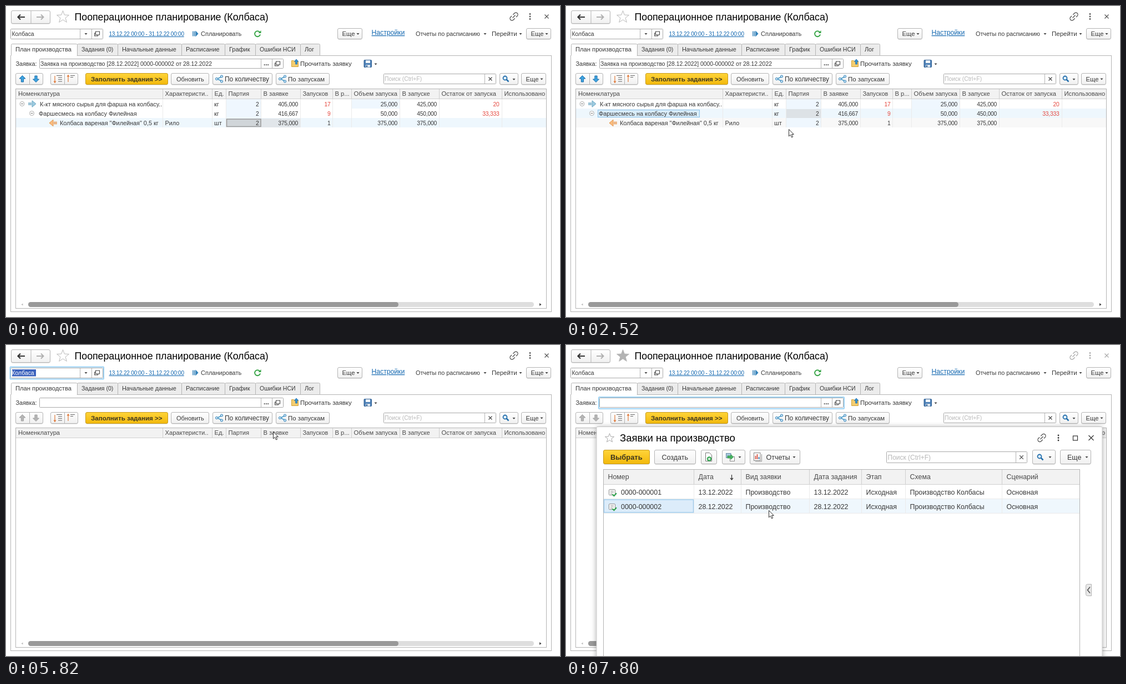
These frames come from a looping animation (998 px wide and 561 px high, 8000 ms). An HTML page:

```html
<!DOCTYPE html>
<html lang="ru">
<head>
<meta charset="utf-8">
<title>Пооперационное планирование</title>
<style>
html, body { margin: 0; width: 100%; height: 100%; overflow: hidden; background: #fff; }
svg { display: block; width: 100%; height: 100%; font-family: "Liberation Sans", Arial, sans-serif; }
text { white-space: pre; }
</style>
</head>
<body>
<svg id="stage" viewBox="0 0 998 561"></svg>
<script>
const LOOP = 8000, TICK = 60;
const SELECT_ROW = 1800, CLEAR = 3780, DIALOG = 6840;
const INK = '#383838', LINE = '#b4b4b4', RED = '#e5483f', BLUE = '#2f7fb8', LINK = '#1468b0';

// drawing helpers
const text = (x, y, s, size = 11, fill = INK, extra = '') =>
  `<text x="${x}" y="${y}" font-size="${size}" fill="${fill}" ${extra}>${s}</text>`;
const num = (x, y, s, fill = INK) =>
  text(x, y, s, 10.3, fill, 'text-anchor="end" letter-spacing="-.2"');
const rect = (x, y, x2, y2, fill = '#fff', stroke = 'none', r = 0, w = 1) =>
  `<rect x="${x}" y="${y}" width="${x2 - x}" height="${y2 - y}" rx="${r}" fill="${fill}" stroke="${stroke}" stroke-width="${w}"/>`;
const path = (d, stroke = INK, w = 1, fill = 'none') =>
  `<path d="${d}" fill="${fill}" stroke="${stroke}" stroke-width="${w}"/>`;
const solid = (d, fill) => path(d, 'none', 0, fill);
const circle = (x, y, r, fill, stroke = 'none', w = 1) =>
  `<circle cx="${x}" cy="${y}" r="${r}" fill="${fill}" stroke="${stroke}" stroke-width="${w}"/>`;
const vline = (x, y, y2, c = LINE) => path(`M${x} ${y}V${y2}`, c);
const at = (x, y, body, turn = '') => `<g transform="translate(${x} ${y}) ${turn}">${body}</g>`;
const during = (from, to, body) => `<g data-from="${from}" data-to="${to}">${body}</g>`;

// widgets
const button = (x, y, x2, y2, fill = 'url(#btn)', stroke = LINE) =>
  rect(x + .5, y + 1.5, x2 - .5, y2 + .5, 'none', '#e4e4e4', 2.5) +
  rect(x + .5, y + .5, x2 - .5, y2 - .5, fill, stroke, 2.5);
const field = (x, y, x2, y2) => rect(x + .5, y + .5, x2 - .5, y2 - .5, '#fff', '#a9a9a9', 1);
const focus = (x, y, x2, y2) => rect(x, y, x2, y2, 'none', '#9ed3f5', 1, 2);
const caret = (x, y) => solid(`M${x - 2.5} ${y - 1}h5l-2.5 3z`, '#444');
const more = (x, y, x2, y2, size = 11.3) => button(x, y, x2, y2) +
  text(x + (size > 12 ? 13 : 8.5), (y + y2) / 2 + size * .36, 'Еще', size) + caret(x2 - 8, (y + y2) / 2);
const cross = (x, y, r = 3.3, c = '#444') =>
  path(`M${x - r} ${y - r}l${2 * r} ${2 * r}M${x + r} ${y - r}l${-2 * r} ${2 * r}`, c, 1.2);
const dots = (x, y, c = INK) => [-4.5, 0, 4.5].map(d => circle(x, y + d, 1.4, c)).join('');
const chain = (x, y, c = '#555') => at(x, y,
  path('M1 -3.5H5a3.5 3.5 0 0 1 0 7H2M-1 3.5H-5a3.5 3.5 0 0 1 0 -7H-2M-3.5 0H3.5', c, 1.3), 'rotate(-45)');
const openIcon = (x, y) => at(x, y, path('M-2.5 -4h7v6h-7zM-2.5 -1h-2v5h6v-2', '#444', 1.1));
const lens = (x, y) => circle(x - 1, y - 1.5, 3.5, '#e3f1fb', '#2570ad', 1.8) + path(`M${x + 1.5} ${y + 1}l4 4`, '#2570ad', 2.5);
const star = (x, y, r, fill, stroke) => {
  const pts = Array.from({length: 10}, (_, i) => {
    const a = Math.PI * (i / 5 - .5), q = i % 2 ? r * .42 : r;
    return `${(x + q * Math.cos(a)).toFixed(1)},${(y + q * Math.sin(a)).toFixed(1)}`;
  });
  return `<polygon points="${pts.join(' ')}" fill="${fill}" stroke="${stroke}"/>`;
};
const share = (x, y) => path(`M${x + 5} ${y - 4}L${x - 4} ${y}L${x + 5} ${y + 4}`, '#4499c8', 1.6) +
  [-1, 0, 1].map(k => circle(x + (k ? 4.5 : -4.5), y + k * 4.5, 2.1, '#cbe7f6', BLUE)).join('');
const moveArrow = (x, dir, fill, stroke) =>
  at(x, 131.5, path('M0 -6l5.5 5.5h-3.4v6h-4.2v-6h-3.4z', stroke, 1, fill), `scale(1 ${dir})`);
const moveArrows = (...colors) => moveArrow(29.5, 1, ...colors) + moveArrow(54, -1, ...colors);
const listIcon = (x, up) => at(x, 131.5, path('M0 -5.5v11', '#e07b3c', 1.2) +
  solid(up ? 'M-2.5 -4l2.5 -4 2.5 4z' : 'M-2.5 4l2.5 4 2.5 -4z', '#e07b3c') +
  path(up ? 'M4 -6h8M4 -3h5' : 'M3 -6h10M6 -2.5h7M6 1h7M6 4.5h7', '#666', 1.1));
const minus = (x, y) => circle(x, y, 4, '#fff', '#aaa') + path(`M${x - 2} ${y}h4`, '#777');
const rowArrow = (x, y, dir, fill, stroke) => at(x, y,
  path('M-1 -2.5v-3.3l7 5.8 -7 5.8v-3.3z', stroke, 1, fill) +
  path('M-7 -2.5v5M-5 -2.5v5M-3 -2.5v5', stroke, 1.3), `scale(${dir} 1)`);

const columns = [18, 282.5, 371.5, 396.5, 459.5, 530.5, 588.5, 622.5, 709.5, 780.5, 893.5];
const titles = ['Номенклатура', 'Характеристи..', 'Ед.', 'Партия', 'В заявке', 'Запусков', 'В р...',
  'Объем запуска', 'В запуске', 'Остаток от запуска', 'Использовано'];
const tabs = [[9, 'План производства', 11.2], [128, 'Задания (0)', 10.5], [201, 'Начальные данные', 10.8],
  [316, 'Расписание', 11], [394, 'График', 11], [449, 'Ошибки НСИ', 10.5], [530, 'Лог', 10.8], [565]];

function windowIcons(starFill, starLine, color) {
  return star(102.5, 20, 11.5, starFill, starLine) + chain(915, 19, color) + dots(944, 19, color) + cross(974, 19, 3.5, color);
}

function header() {
  return button(9, 8, 80, 32) + vline(45, 9, 31) +
    path('M34 20H22M26 15.5L21.5 20l4.500 4.5', '#333', 2.2) +
    path('M55 20h12M63 15.5l4.500 4.500 -4.500 4.5', '#b0b0b0', 2) +
    during(0, DIALOG, windowIcons('#fff', '#b9b9b9', '#555')) +
    during(DIALOG, LOOP, windowIcons('#b3b3b3', '#b3b3b3', '#aaa')) +
    text(123.5, 26, 'Пооперационное планирование (Колбаса)', 17.75, '#000') +
    field(8, 41, 175, 60) + vline(133.5, 42, 59) + vline(154.5, 42, 59) +
    caret(144, 50) + openIcon(164, 50) + text(10.5, 54, 'Колбаса', 10.4) +
    during(CLEAR, DIALOG, rect(11, 44, 54, 56.5, '#3c62bd') + text(10.5, 54, 'Колбаса', 10.4, '#fff') + focus(7.5, 39.5, 176, 61.5)) +
    text(185.5, 54, '13.12.22 00:00 - 31.12.22 00:00', 10, LINK, 'text-decoration="underline" letter-spacing="-.23"') +
    path('M337 45.5v9M339.8 45.5v9', BLUE, 1.6) + solid('M341.5 44.5v11l5 -5.5z', BLUE) +
    text(351, 54, 'Спланировать') +
    path('M457.2 47.3a5 5 0 1 0 .8 4', '#37a547', 1.9) + solid('M459.5 44v5h-5z', '#37a547') +
    more(597, 40, 642, 60) +
    text(658.5, 52, 'Настройки', 12.2, LINK, 'text-decoration="underline"') +
    text(738, 54, 'Отчеты по расписанию', 10.8) + caret(863, 50) +
    text(875, 54, 'Перейти', 11.5) + caret(927, 50) + more(937, 40, 982, 60);
}

function tabBar() {
  let s = rect(8.5, 89.5, 982.5, 551.5, '#fff', LINE);
  tabs.slice(0, -1).forEach(([x, label, size], i) => {
    const end = tabs[i + 1][0];
    s += path(`M${x + .5} 89.5V70.5q0 -2 2 -2H${end - 1.5}q2 0 2 2V89.5`, LINE, 1, i ? '#ececec' : '#fff') +
      text(x + 8, 82, label, size);
  });
  return s + path('M9.5 89.5H127.5', '#fff', 1.4) + path('M128 89.5H565', LINE);
}

function orderBar() {
  return text(17.5, 108, 'Заявка:', 10.8) + field(60, 95, 500, 113) + vline(459.5, 96, 112) + vline(479.5, 96, 112) +
    text(464, 107, '...', 11.5, '#222', 'font-weight="bold"') + openIcon(489, 104) +
    during(0, CLEAR, text(62, 108, 'Заявка на производство [28.12.2022] 0000-000002 от 28.12.2022', 10.37)) +
    during(DIALOG, LOOP, focus(59, 94, 501, 115)) +
    path('M514.5 109.5v-11h4l1.5 2h6.5v9z', '#d2a33c', 1, '#f4cd6f') +
    path('M521.5 105v-5h-2.2l3.7 -4 3.7 4h-2.2v5z', '#266fa8', .8, '#3a93d0') +
    text(530, 108, 'Прочитать заявку', 11.35) +
    rect(645, 97.5, 658.5, 110.5, '#4a7eb5', '#315f92', 1) + rect(648, 98, 656, 103, '#eef4f9') +
    rect(648, 106, 656, 110.5, '#dbe5ee') + rect(649, 107, 651, 110, '#315f92') + caret(666, 104.5);
}

function commandBar() {
  return button(17, 121, 67, 142) + vline(42.5, 122, 141) +
    during(0, CLEAR, moveArrows('#3da3e0', '#1b6ba6')) + during(CLEAR, LOOP, moveArrows('#b5b5b5', '#a2a2a2')) +
    button(80, 121, 130, 142) + vline(105.5, 122, 141) + listIcon(88, false) + listIcon(112, true) +
    button(143, 121, 292, 142, 'url(#gold)', '#c79a1c') +
    text(153, 135.5, 'Заполнить задания &gt;&gt;', 11.6, '#3b3520', 'font-weight="bold"') +
    button(297, 121, 366, 142) + text(307, 135.5, 'Обновить') +
    button(372, 121, 480, 142) + share(384, 131.5) + text(394, 135.5, 'По количеству', 11.9) +
    button(486, 121, 583, 142) + share(498, 131.5) + text(508, 135.5, 'По запускам', 11.4) +
    field(680, 122, 883, 141) + vline(862.5, 123, 140) + text(682, 135, 'Поиск (Ctrl+F)', 10.4, '#b8b8b8') +
    cross(872.5, 131.5, 3) + button(889, 121, 923, 142) + lens(900, 131.5) + caret(915, 132) + more(928, 121, 973, 142);
}

function grid() {
  let s = rect(17.5, 149.5, 973.5, 545.5, '#fff', LINE) + rect(18, 150, 973, 167.5, '#f2f2f2') + path('M18 167.5H973', '#d0d0d0');
  columns.forEach((x, i) => {
    s += (i ? vline(x, 150, 167, '#cfcfcf') : '') + text(x + 4, 162, titles[i], i === 5 ? 10.8 : 11.2, '#4a4a4a');
  });
  return s + rect(40, 534, 951, 543, '#dedede', 'none', 4.5) + rect(40, 534, 707, 543, '#999', 'none', 4.5) +
    solid('M30.5 536.5v4l-3 -2z', '#bbb') + solid('M961 536v5l3.5 -2.5z', '#444');
}

function rowBands(selected) {
  const top = 168 + selected * 17;
  let s = rect(397, 168, 459, 219, '#eff7fe') + rect(623, 168, 709, 185, '#eff7fe');
  if (selected === 1) s += rect(18, 202, 397, 219, '#f8f8f8') + rect(460, 202, 973, 219, '#f8f8f8');
  s += rect(18, top, 973, top + 17, '#eef7fd');
  columns.slice(1).forEach(x => s += vline(x, 168, 219, '#ebebeb'));
  if (selected === 2)
    return s + rect(460, 203, 530, 219, '#e1e6ea') + rect(397.5, 204, 459, 217.5, '#d0d5d9', '#999', 0, 1.5);
  return s + rect(397, 186, 459, 202, '#dde2e6') + rect(57.5, 187.5, 240.5, 200.5, '#d8ecfa', '#8dc3ea');
}

function rowData() {
  const rows = [
    [61, 'К-кт мясного сырья для фарша на колбасу..', 'кг', '405,000', '17', '25,000', '425,000', '20'],
    [59, 'Фаршесмесь на колбасу Филейная', 'кг', '416,667', '9', '50,000', '450,000', '33,333'],
    [97, 'Колбаса вареная "Филейная" 0,5 кг', 'шт', '375,000', '1', '375,000', '375,000', '']];
  return rows.map(([x, name, unit, ordered, runs, size, total, rest], i) => {
    const y = 180.7 + i * 17.1;
    return text(x, y, name, 10.85) + text(375, y, unit, 10.8) + num(455.5, y, '2') + num(526, y, ordered) +
      num(584.5, y, runs, runs > 1 ? RED : INK) + num(705, y, size) + num(776, y, total) + num(888.5, y, rest, RED);
  }).join('') + text(286.5, 215, 'Рило', 10.8) + minus(29, 176.5) + minus(46.5, 193.5) +
    rowArrow(48, 176.5, 1, '#9dcbe0', '#6aa6c2') + rowArrow(84, 211, -1, '#f9bd80', '#e5944c');
}

function dialogBar() {
  return star(78.5, 168, 8.5, '#fff', '#aaa') + text(97, 173.5, 'Заявки на производство', 18.5, '#000') +
    chain(857, 167.5) + dots(887, 167.5) + rect(913.5, 164, 921.5, 172, 'none', '#333', 0, 1.2) + cross(946, 167.5, 4.5, '#333') +
    button(67, 189, 151, 215, 'url(#gold)', '#c79a1c') + text(80, 206.5, 'Выбрать', 12.9, '#3b3520', 'font-weight="bold"') +
    button(159, 189, 234, 215) + text(172.5, 206.5, 'Создать', 12.5) +
    button(243, 189, 272, 215) + path('M251.5 194.5h7l4 4v11h-11z', '#777', 1, '#fff') +
    circle(258, 205.5, 4.2, '#2fa44d') + path('M255.5 205.5h5M258 203v5', '#fff', 1.3) +
    button(281, 189, 323, 215) + rect(288.5, 195.5, 297, 203.5, '#a8c7dc', '#6a8fa8') + rect(295.5, 201.5, 303.5, 209.5, '#fff', '#888') +
    path('M291 200h6v-2.5l4.5 4.5 -4.5 4.5v-2.5h-6z', '#2b8c43', .8, '#45b35f') + caret(313, 202) +
    button(331, 189, 422, 215) + rect(338.5, 194.5, 350, 208.5, '#fff', '#888') + path('M341.5 206v-6M344.5 206v-9', '#d96051', 2) +
    path('M347.5 206v-4', '#4a90c4', 2) + path('M352.5 197v13H341', '#999') + text(360.5, 206.5, 'Отчеты', 12.5) + caret(411, 202) +
    field(577, 192, 831, 213) + vline(810.5, 193, 212) + text(579.5, 207, 'Поиск (Ctrl+F)', 12, '#b8b8b8') + cross(820.5, 202.5) +
    button(840, 189, 882, 215) + lens(854, 202.5) + caret(872, 202) + more(890, 189, 946, 215, 12.5);
}

function dialogTable() {
  const cols = [67.5, 230.5, 315.5, 438.5, 532.5, 611.5, 785.5];
  const heads = ['Номер', 'Дата', 'Вид заявки', 'Дата задания', 'Этап', 'Схема', 'Сценарий'];
  let s = rect(67.5, 224.5, 925.5, 580, '#fff', LINE) + rect(68, 225, 925, 251.5, '#f2f2f2') + path('M68 251.5H925', '#d0d0d0') +
    rect(68, 278, 925, 303.5, '#eff7fd') + path('M68 277.5H925M68 303.5H925', '#eaeaea');
  cols.forEach((x, i) => {
    s += (i ? vline(x, 225, 251, '#cfcfcf') + vline(x, 252, 303, '#ebebeb') : '') + text(x + 8, 242.3, heads[i], 12.4, '#4a4a4a');
  });
  s += path('M298.5 234v8M296 240l2.5 3 2.5 -3', '#333', 1.2) + rect(68.5, 279, 229.5, 302, '#dcecfa', '#9ccbed', 0, 1.3);
  ['13.12.2022', '28.12.2022'].forEach((date, r) => {
    const y = 269.7 + r * 26;
    ['0000-00000' + (r + 1), date, 'Производство', date, 'Исходная', 'Производство Колбасы', 'Основная'].forEach((v, i) =>
      s += text(i ? cols[i] + 8 : 99, y, v, 12.4));
    s += at(77.5, y, rect(0, -9, 11, 1, '#fff', '#888', 1) + path('M2.5 -6h6M2.5 -3.5h6M2.5 -1h3', '#999') +
      path('M6 -.5l3 3 4.5 -5', '#2fa44d', 2.2));
  });
  return s + path('M946.5 431.5h-7q-3 0 -3 3v15q0 3 3 3h7z', '#b5b5b5', 1, '#e8e8e8') + path('M944 436.5l-4.5 5.5 4.5 5.5', '#555', 1.6);
}

const dialog = () =>
  `<g filter="url(#shadow)">${rect(55, 147.5, 966, 580, '#fff', '#c4c4c4', 2)}</g>` + dialogBar() + dialogTable();

const stage = document.getElementById('stage');
stage.innerHTML = `<defs>
  <linearGradient id="btn" x2="0" y2="1"><stop stop-color="#fff"/><stop offset="1" stop-color="#f0f0f0"/></linearGradient>
  <linearGradient id="gold" x2="0" y2="1"><stop stop-color="#ffd43a"/><stop offset="1" stop-color="#f2b90c"/></linearGradient>
  <filter id="shadow" x="-5%" y="-5%" width="110%" height="110%"><feDropShadow dx="0" dy="1" stdDeviation="5" flood-opacity=".32"/></filter>
  </defs>` + rect(0, 0, 998, 561) + header() + tabBar() + orderBar() + commandBar() + grid() +
  during(0, SELECT_ROW, rowBands(2)) + during(SELECT_ROW, CLEAR, rowBands(1)) + during(0, CLEAR, rowData()) +
  during(DIALOG, LOOP, dialog()) +
  `<g id="pointer">${path('M.5 .5v12.5l2.9 -2.7 2.1 4.7 2.1 -.9 -2.1 -4.6h3.8z', '#333', 1, '#fff')}</g>`;

// pointer moves: start, spacing, points; without points the pointer is away
const moves = [
  [0, 60, []],
  [300, 60, [[867, 250], [673, 309], [500, 303], [470, 280], [456, 236], [456, 218], [461, 203]]],
  [960, 260, [[461, 203], [497, 164], [392, 160], [259, 196]]],
  [1800, 120, [[259, 197], [259, 214], [217, 220], [282, 257], [335, 218], [385, 235], [401, 222]]],
  [2580, 120, [[486, 140], [585, 122], [760, 199], [893, 158], [965, 67], [985, 56]]],
  [3300, 60, [[988, 49]]],
  [3360, 60, []],
  [4020, 60, [[961, 222], [861, 304], [782, 335], [722, 345], [681, 342], [635, 330], [620, 326]]],
  [4680, 60, [[615, 326]]],
  [5280, 195, [[612, 324], [555, 282], [497, 205], [476, 141], [467, 111]]],
  [6120, 60, [[467, 102]]],
  [6420, 90, [[463, 97], [460, 93], [468, 102]]],
  [7140, 220, [[466, 108], [441, 180], [393, 261], [365, 298]]]
];

function pointerAt(time) {
  const [start, gap, pts] = moves.findLast(m => m[0] <= time);
  if (!pts.length) return null;
  const tick = Math.floor(time / TICK + 1e-6) * TICK;
  const pos = Math.min(Math.max(0, (tick - start) / gap), pts.length - 1);
  const i = Math.floor(pos), a = pts[i], b = pts[i + 1] || a;
  return a.map((v, k) => Math.round(v + (b[k] - v) * (pos - i)));
}

const pointer = document.getElementById('pointer');
const timed = [...stage.querySelectorAll('[data-from]')];
const origin = performance.now();

function draw(now) {
  const time = Math.max(0, now - origin) % LOOP;
  for (const g of timed)
    g.style.display = time >= +g.dataset.from && time < +g.dataset.to ? '' : 'none';
  const p = pointerAt(time);
  pointer.style.display = p ? '' : 'none';
  if (p) pointer.setAttribute('transform', `translate(${p.join(' ')})`);
  requestAnimationFrame(draw);
}
draw(origin);
</script>
</body>
</html>
```
